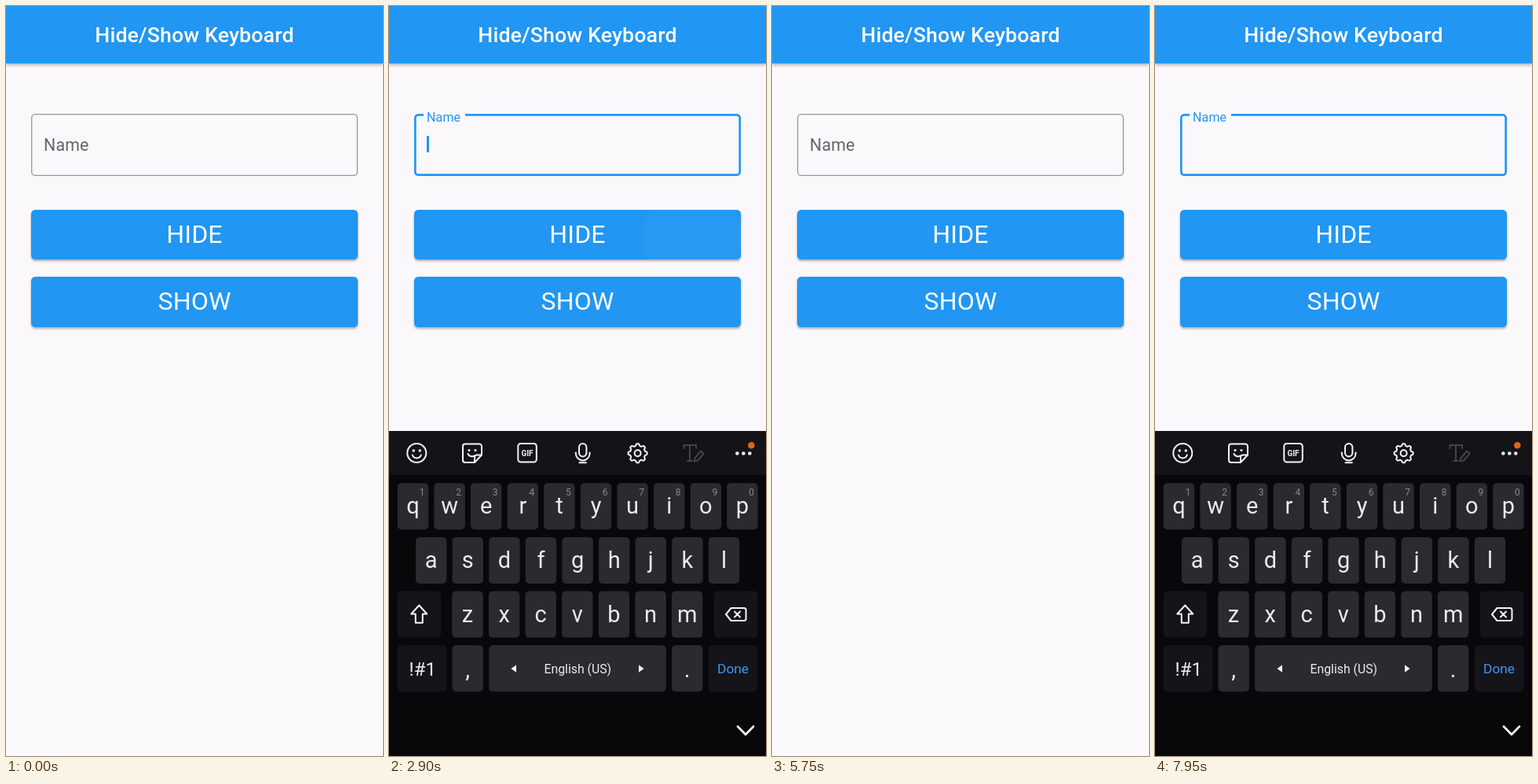
An HTML page for the animation above (8 s loop, 480 by 953 pixels).

```html
<!DOCTYPE html>
<html lang="en">
<head>
<meta charset="utf-8">
<title>Hide/Show Keyboard</title>
<style>
  :root { --blue: #2196f3; --bg: #faf8fb; --std: cubic-bezier(.4, 0, .2, 1); }
  html, body { margin: 0; width: 100%; height: 100%; overflow: hidden; background: var(--bg); }
  body { position: relative; font-family: Roboto, sans-serif; }
  body * { position: absolute; box-sizing: border-box; }
  svg * { position: static; }

  .bar {
    left: 0; top: 0; width: 480px; height: 73px; line-height: 74.5px;
    background: var(--blue); color: #fff; text-align: center;
    font-size: 26.67px; font-weight: 500; letter-spacing: .15px;
    box-shadow: 0 2px 4px rgba(0, 0, 0, .3);
  }

  .field {
    left: 32px; top: 137.3px; width: 416px; height: 78.5px; border-radius: 5.3px;
    animation: outline 8s var(--std) infinite;
  }
  .gap {
    left: 44px; top: 136px; width: 53px; height: 6px; background: var(--bg);
    transform-origin: left; animation: gap 8s var(--std) infinite;
  }
  .label {
    left: 48px; top: 164px; font-size: 21.33px; line-height: 25px; letter-spacing: .2px;
    transform-origin: 0 0; animation: label 8s var(--std) infinite;
  }
  .caret {
    left: 48px; top: 165px; width: 2.67px; height: 21px; background: var(--blue);
    animation: blink 8s step-end infinite;
  }

  .btn {
    left: 32px; width: 416px; height: 63.7px; line-height: 63.7px; border-radius: 5.3px;
    background: var(--blue); color: #fff; text-align: center;
    font-size: 32px; letter-spacing: .2px;
  }
  .hide { top: 258.8px; animation: lift-hide 8s var(--std) infinite; }
  .show { top: 344px; animation: lift-show 8s var(--std) infinite; }
  .ink { inset: 0; overflow: hidden; border-radius: inherit; }
  .ink i {
    --touch: translate(147px, 3px) scale(.293);
    left: -7px; top: -183px; width: 430px; height: 430px; border-radius: 50%;
    background: rgba(255, 255, 255, .24);
  }
  .hide i { animation: grow-hide 8s ease infinite, fade-hide 8s linear infinite; }
  .show i { animation: grow-show 8s ease infinite, fade-show 8s linear infinite; }
  .btn b { inset: 0; font-weight: 400; }

  .keys { left: 0; top: 540px; width: 480px; height: 413px; animation: slide 8s var(--std) infinite; }
  .keys text { font-family: Roboto, sans-serif; text-anchor: middle; fill: #ececee; }
  .icon { fill: none; stroke: #f4f4f6; stroke-width: 2; stroke-linecap: round; stroke-linejoin: round; }
  .chevron { animation: chevron 8s linear infinite; }

  /* Presses: 350-1540, 2890-4110 and 5870-7250 ms; focus follows each release */
  @keyframes outline {
    0%, 19.25%, 53.875%, 90.625% { box-shadow: inset 0 0 0 1.33px #99979b; }
    21.75%, 51.375%, 93.125%, 100% { box-shadow: inset 0 0 0 2.67px #2196f3; }
  }
  @keyframes gap {
    0%, 19.25%, 53.875%, 90.625% { transform: scaleX(0); }
    21.75%, 51.375%, 93.125%, 100% { transform: none; }
  }
  @keyframes label {
    0%, 19.25%, 53.875%, 90.625% { transform: none; color: #666468; }
    21.75%, 51.375%, 93.125%, 100% { transform: translateY(-32.5px) scale(.75); color: #2196f3; }
  }
  @keyframes blink {
    0%, 25.5%, 38.2%, 51.1%, 97.5%, 100% { opacity: 0; }
    19.375%, 31.75%, 44.4%, 91.125% { opacity: 1; }
  }
  @keyframes slide {
    0%, 20.25%, 54.75%, 91.625% { transform: translateY(414px); }
    23.25%, 51.625%, 94.625%, 100% { transform: none; }
  }
  @keyframes chevron {
    0%, 25.5%, 60%, 96% { opacity: .67; }
    28.5%, 59.9%, 98.8%, 100% { opacity: 1; }
  }

  @keyframes lift-hide {
    0%, 36.125%, 53.875%, 100% { box-shadow: 0 2px 3px rgba(0, 0, 0, .32); }
    38.625%, 51.375% { box-shadow: 0 5px 11px rgba(0, 0, 0, .33); }
  }
  @keyframes lift-show {
    0%, 4.375%, 21.75%, 73.375%, 93.125%, 100% { box-shadow: 0 2px 3px rgba(0, 0, 0, .32); }
    6.875%, 19.25%, 75.875%, 90.625% { box-shadow: 0 5px 11px rgba(0, 0, 0, .33); }
  }
  @keyframes grow-hide {
    0%, 36.125% { transform: var(--touch); }
    49.875%, 100% { transform: none; }
  }
  @keyframes grow-show {
    0%, 4.375%, 60.01%, 73.375% { transform: var(--touch); }
    18.125%, 60%, 87.125%, 100% { transform: none; }
  }
  @keyframes fade-hide {
    0%, 36.125%, 57.125%, 100% { opacity: 0; }
    37.0625%, 55.25% { opacity: 1; }
  }
  @keyframes fade-show {
    0%, 4.375%, 25%, 73.375%, 96.375%, 100% { opacity: 0; }
    5.3125%, 23.125%, 74.3125%, 94.5% { opacity: 1; }
  }
</style>
</head>
<body>
  <div class="field"></div>
  <div class="gap"></div>
  <div class="label">Name</div>
  <div class="caret"></div>
  <div class="btn hide"><div class="ink"><i></i></div><b>HIDE</b></div>
  <div class="btn show"><div class="ink"><i></i></div><b>SHOW</b></div>
  <div class="bar">Hide/Show Keyboard</div>

  <svg class="keys" viewBox="0 540 480 413">
    <rect y="540" width="480" height="413" fill="#08070a"/>
    <rect y="540" width="480" height="56" fill="#141317"/>
    <g id="caps"></g>

    <g class="icon">
      <circle cx="35.3" cy="568" r="12"/>
      <path d="M29.8 570.5a5.8 5.8 0 0 0 11 0"/>
      <path d="M97 556.5h18a3 3 0 0 1 3 3v11l-9 9.5h-12a3 3 0 0 1-3-3v-17.5a3 3 0 0 1 3-3zM118 570.5h-6a3 3 0 0 0-3 3v6.5M100.5 569a5.5 5.5 0 0 0 8 2.5"/>
      <rect x="164.3" y="556" width="23.5" height="23.5" rx="3.5"/>
      <rect x="242" y="556" width="9.4" height="16.5" rx="4.7"/>
      <path d="M237.8 567.5v1a8.9 8.9 0 0 0 17.8 0v-1M242.5 580.3h8.4"/>
      <path id="gear"/>
      <circle cx="316.6" cy="568.3" r="4"/>
      <path stroke="#444347" d="M375.5 562v-4h15.5v4M383 558v20M380 578h6M389.5 574.5l7.5-9 3.7 3.2-7.5 8.8-4.7 1z"/>
      <path d="M38.3 761.5l10 11h-5.5v11.3h-9V772.5h-5.5z"/>
      <path d="M435.5 765h16.5a2.5 2.5 0 0 1 2.5 2.5v11a2.5 2.5 0 0 1-2.5 2.5h-16.5l-6.5-8zM440 769.5l7 7M447 769.5l-7 7"/>
      <path class="chevron" stroke-width="2.7" d="M444 915.5l10 10.3 10-10.3"/>
    </g>
    <g fill="#f4f4f6">
      <circle cx="31.3" cy="565" r="1.7"/><circle cx="39.3" cy="565" r="1.7"/>
      <circle cx="102" cy="564.5" r="1.6"/><circle cx="110" cy="564.5" r="1.6"/>
      <circle cx="443.3" cy="568.5" r="2.3"/><circle cx="451.3" cy="568.5" r="2.3"/><circle cx="459.3" cy="568.5" r="2.3"/>
      <path d="M162 837.3v9.4l-6.5-4.7zM318 837.3v9.4l6.5-4.7z"/>
    </g>
    <circle cx="461.3" cy="558.3" r="4.3" fill="#dd6510"/>
    <text x="176" y="571.7" font-size="10" font-weight="700">GIF</text>
  </svg>

<script>
  const PITCH = 46.6, KEY = '#2b2a2e', DARK = '#151418';
  let out = '';
  const key = (x, y, w, fill = KEY) => {
    out += `<rect x="${x}" y="${y}" width="${w}" height="59" rx="5" fill="${fill}"/>`;
  };
  const text = (s, x, y, size, fill = '#ececee') => {
    out += `<text x="${x}" y="${y}" font-size="${size}" style="fill:${fill}">${s}</text>`;
  };
  const row = (letters, x0, y, digits = '') => [...letters].forEach((c, i) => {
    const x = x0 + i * PITCH;
    key(x, y, 39.4);
    text(c, x + 19.7, y + 39, 29);
    if (digits) text(digits[i], x + 31.2, y + 16, 12, '#89888c');
  });

  row('qwertyuiop', 10.8, 606.3, '1234567890');
  row('asdfghjkl', 34, 675);
  row('zxcvbnm', 80.3, 743.6);
  key(10.8, 743.6, 55.3, DARK);
  key(414, 743.6, 55.4, DARK);
  key(10.8, 812.2, 62.5, DARK);
  key(80.5, 812.2, 39.4);
  key(127.2, 812.2, 225.6);
  key(360, 812.2, 39.4);
  key(406.8, 812.2, 62.7, DARK);
  text('!#1', 42.8, 850.5, 24);
  text(',', 100.2, 853, 29);
  text('English (US)', 240.3, 847.8, 15.8);
  text('.', 379.7, 853, 29);
  text('Done', 438, 848.2, 17.3, '#3d96f5');
  document.getElementById('caps').innerHTML = out;

  // Eight-toothed gear from a clipped cosine
  let gear = '';
  for (let a = 0; a < 360; a += 3) {
    const t = a * Math.PI / 180;
    const r = 10.8 + Math.max(-1.2, Math.min(1.2, 2 * Math.cos(8 * t)));
    gear += (a ? 'L' : 'M') + (316.6 + r * Math.sin(t)).toFixed(2) + ' ' + (568.3 - r * Math.cos(t)).toFixed(2);
  }
  document.getElementById('gear').setAttribute('d', gear + 'Z');
</script>
</body>
</html>
```
